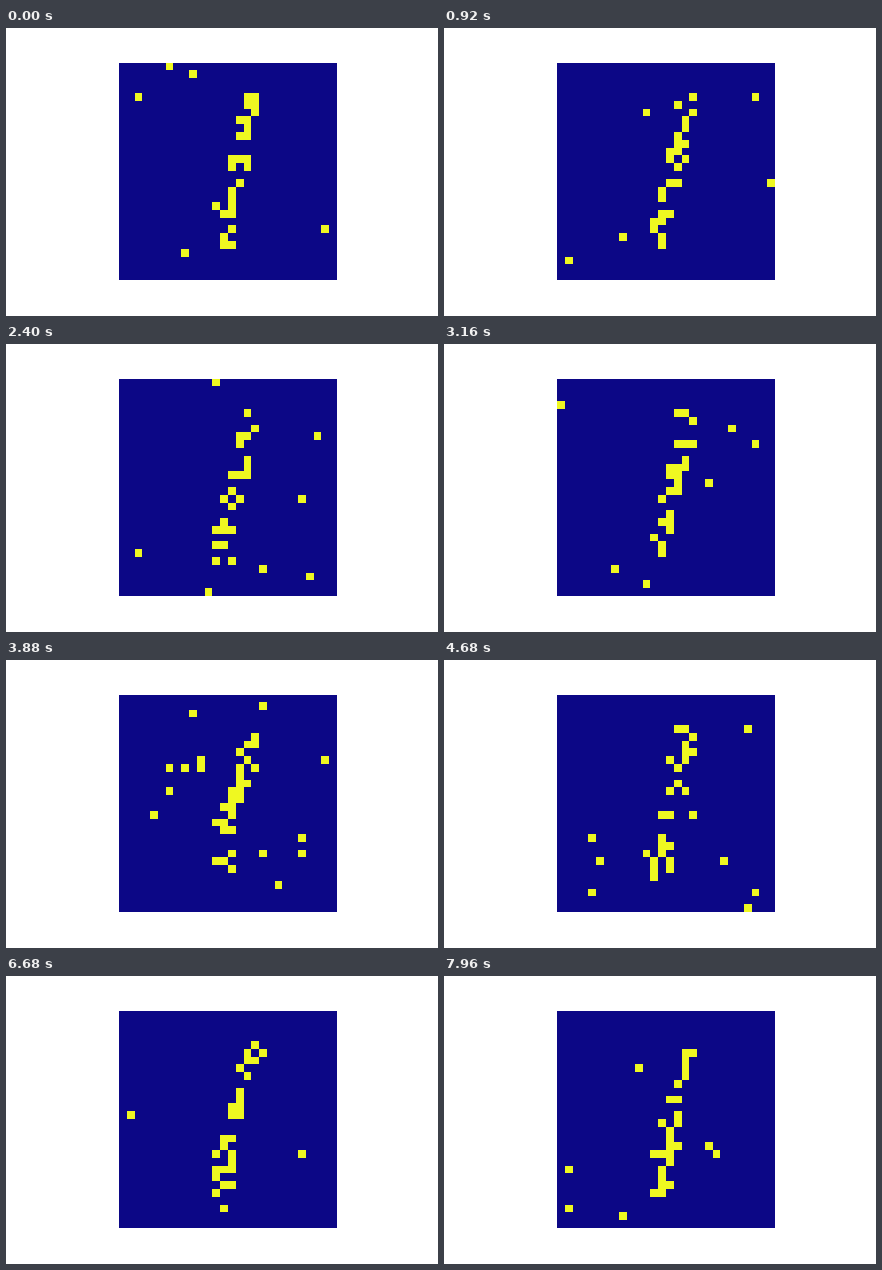
A matplotlib script for the animation above (8 s loop, 432 by 288 pixels).

```python
import numpy as np
import matplotlib.pyplot as plt
from matplotlib.animation import FuncAnimation

N = 28
FRAMES = 200
INTERVAL = 40
NOISE = 0.0105
PEAK = 0.52


def spike_rates():
    """Firing probability per cell: a slanted stroke over faint noise."""
    rows, cols = np.mgrid[:N, :N]
    centre = np.interp(rows, [4, 9, 14, 18, 23], [16.2, 15.5, 14.2, 13.3, 13.0])
    stroke = PEAK * np.exp(-((cols - centre) / 1.35) ** 4)
    stroke[(rows < 4) | (rows > 23)] = 0
    return np.maximum(stroke, NOISE)


rates = spike_rates()
spikes = np.random.default_rng(7).random((FRAMES, N, N)) < rates

fig, ax = plt.subplots(figsize=(6, 4), dpi=72, facecolor="white")
fig.subplots_adjust(left=0.125, right=0.9, bottom=0.125, top=0.88)
ax.axis("off")
image = ax.imshow(spikes[0].astype(float), cmap="plasma", vmin=0, vmax=1,
                  interpolation="nearest")


def update(i):
    image.set_data(spikes[i].astype(float))
    return [image]


anim = FuncAnimation(fig, update, frames=FRAMES, interval=INTERVAL,
                     repeat=True, repeat_delay=0, blit=False)
plt.show()
```
